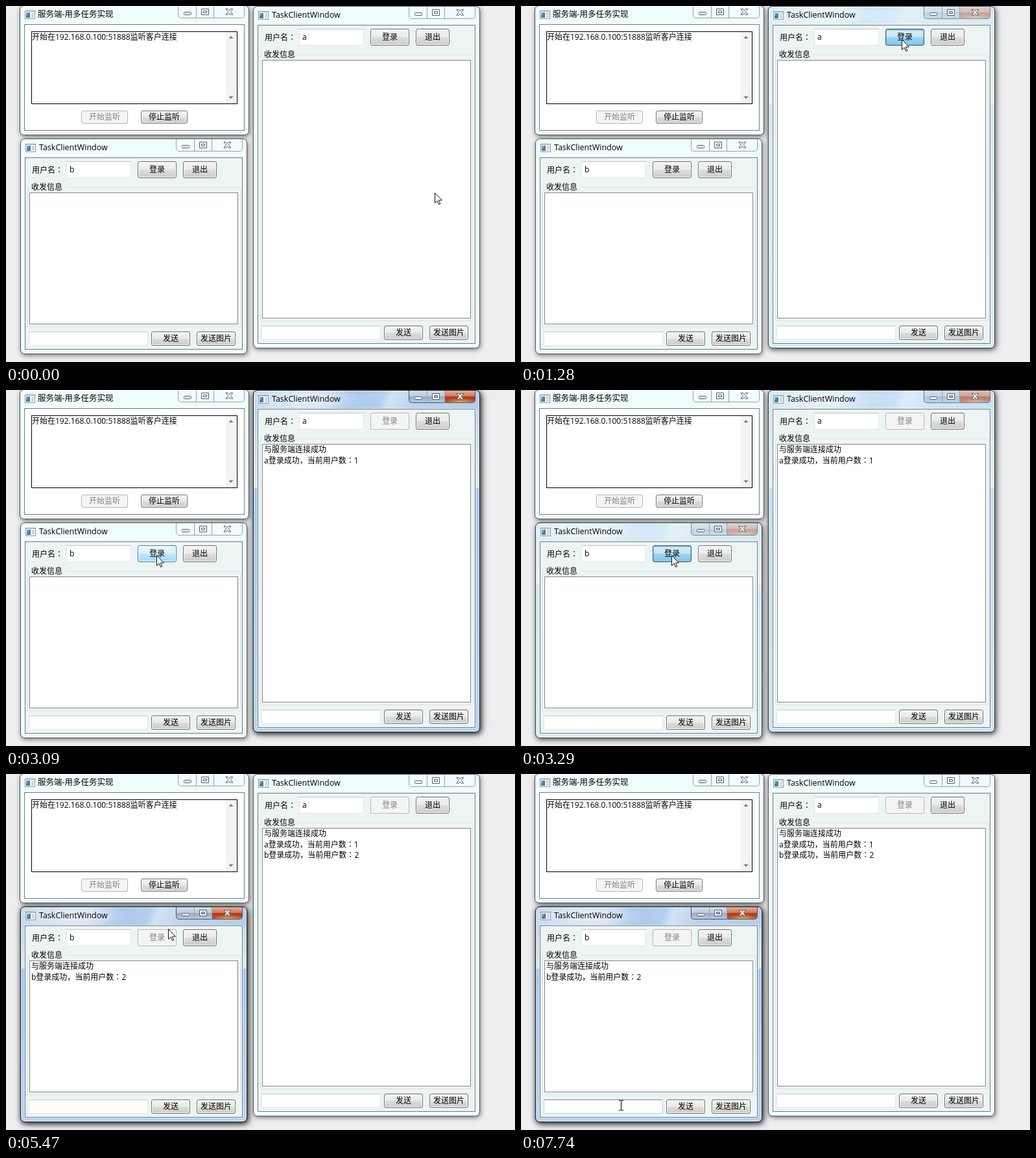
Animation, 785 px wide and 548 px high, one loop 8 s. Source, as an HTML page:

```html
<!DOCTYPE html>
<html lang="zh-CN">
<head>
<meta charset="utf-8">
<title>TaskClientWindow</title>
<style>
html, body { margin: 0; width: 100%; height: 100%; overflow: hidden; background: #eeeef0; }
* { box-sizing: border-box; }
body { position: relative; cursor: default; color: #000;
  font: 12px/16px "Open Sans", "Noto Sans CJK SC", "Noto Sans CJK", sans-serif; }
div { position: absolute; white-space: nowrap; }
svg { position: absolute; left: 0; top: 0; overflow: visible; }
i { font: inherit; font-family: "Noto Sans CJK JP", "Noto Sans CJK", sans-serif; }
.glass { inset: 0; border: 1px solid #4c5659; border-radius: 7px; background: #effdfd;
  box-shadow: inset 0 0 0 1px #fbffff, 1px 2px 7px rgba(0,0,0,.5); }
.lit { opacity: var(--on); border-color: #16191d;
  background:
    radial-gradient(ellipse 90px 24px at 80px 14px, rgba(240,246,252,.85), rgba(240,246,252,0)) no-repeat 0 0 / 100% 29px,
    linear-gradient(110deg, #c6daef 0, #c6daef 32%, #a9c7eb 42%, #b3cff0 56%, #d2e2f4 60%, #bdd3ee 72%, #b4cdea) no-repeat 0 0 / 100% 29px,
    linear-gradient(#b9d1ec 0, #dce8f3 28.6%, #a4caf1 28.7%, #b6d5f4 100%);
  box-shadow: inset 0 0 0 1px rgba(255,255,255,.65), 2px 2px 11px rgba(0,0,0,.7); }
.title { font-size: 12.5px; }
.client { border: 1px solid #6c797c; background: #edf4f4; box-shadow: 0 0 0 1px rgba(255,255,255,.6); }
.caption { border: 1px solid #98a4a7; border-top: 0; border-radius: 0 0 5px 5px; overflow: hidden; }
.caption.hot { opacity: var(--on); border-color: #485567;
  background: linear-gradient(#d3dfed, #b9cbdf 48%, #94abc5 50%, #b4cbe2); }
.close { background:
    radial-gradient(ellipse 24px 8px at 50% 100%, rgba(245,185,95,.9), rgba(245,185,95,0)),
    linear-gradient(#e3b09c, #cd7557 47%, #ad3a1c 50%, #bd5838); }
.btn { border: 1px solid #707070; border-radius: 3px; text-align: center;
  box-shadow: inset 0 0 0 1px rgba(255,255,255,.85);
  background: linear-gradient(#f3f3f3, #ebebeb 50%, #dddddd 50%, #cdcdcd); }
.hover { border-color: #3c7fb1; background: linear-gradient(#eaf6fd, #d9f0fc 50%, #bee6fd 50%, #a7d9f5); }
.press { border-color: #2c628b; box-shadow: inset 0 1px 2px rgba(30,80,115,.6);
  background: linear-gradient(#d8edf9, #c4e5f6 50%, #9fd4f0 50%, #86c5e6); }
.off { border-color: #adb2b5; background: #f4f4f4; color: #838383; }
.field { background: #fff; border: 1px solid #e1e6ea; border-top-color: #c3c8cc; border-radius: 1px; padding-left: 4px; }
.field.over { border-color: #c3dfef; border-top-color: #86b4d4; }
.field.focus { border-color: #b2d5ea; border-top-color: #5d95bf; }
.group { border: 1px solid #d3dde0; border-radius: 3px; box-shadow: inset 0 0 0 1px #fafdfd; }
.legend { background: #edf4f4; padding: 0 4px 0 2px; }
.list { background: #fff; border: 1px solid #828790; }
</style>
</head>
<body>
<script>
const LOOP = 8000;

function add(parent, cls, x, y, w, h, html = "") {
  const e = document.createElement("div");
  e.className = cls;
  e.style.cssText = `left:${x}px;top:${y}px;` + (w ? `width:${w}px;height:${h}px;` : "");
  e.innerHTML = html.replace(/：/g, '<i lang="ja">：</i>');
  parent.append(e);
  return e;
}
// Text placed by its left edge and vertical middle
const text = (p, x, mid, s, cls = "") => add(p, cls, x, mid - 8, 0, 0, s);

function button(p, x, y, w, h, s, cls = "") {
  const b = add(p, "btn " + cls, x, y, w, h, s);
  b.style.lineHeight = h - 2 + "px";
  return b;
}
function field(p, x, y, w, h, s = "") {
  const f = add(p, "field", x, y, w, h, s);
  f.style.lineHeight = h - 3 + "px";
  return f;
}

const ICON = `<svg width="16" height="13">
  <rect x=".5" y=".5" width="15" height="12" fill="#fdfdfd" stroke="#8e989f"/>
  <path d="M1 1.5h14" stroke="#c5ced4"/>
  <rect x="2" y="3" width="6" height="8" fill="#3f7cae"/>
  <rect x="2" y="3" width="3" height="4" fill="#6ba5cf"/>
  <rect x="10" y="3" width="4" height="8" fill="#d3d8dc"/></svg>`;

const GLYPHS = `<svg width="103" height="19" fill="#fff" stroke="#535a66">
  <path d="M28.5 0v19M55.5 0v19" stroke="#98a4a7"/>
  <rect x="9.5" y="9.5" width="11" height="4" rx="1"/>
  <path fill-rule="evenodd" d="M36.5 4.5h11v9h-11zM39.5 7.5h5v3h-5z"/>
  <path d="M74 4.5h3.4l2 2.4 2-2.4h3.4l-3.6 4.3 3.6 4.4h-3.4l-2-2.4-2 2.4h-3.4l3.6-4.4z"/></svg>`;

function frame(x, y, w, h, title, titleX) {
  const win = add(document.body, "win", x, y, w, h);
  win.style.setProperty("--on", 0);
  add(win, "glass", 0, 0);
  add(win, "glass lit", 0, 0);
  add(win, "", 8, 8, 16, 13, ICON);
  text(win, titleX, 14, title, "title");
  add(win, "caption", w - 110, 1, 103, 19);
  add(add(win, "caption hot", w - 110, 1, 103, 19), "close", 55, 0, 48, 19);
  add(win, "", w - 110, 1, 103, 19, GLYPHS);
  win.client = add(win, "client", 7, 29, w - 14, h - 36);
  return win;
}

function server() {
  const win = frame(21, -1, 354, 200, "服务端-用多任务实现", 28);
  win.client.style.background = "#fff";
  const log = add(win, "list", 18, 40, 318, 112);
  log.style.borderColor = "#000";
  text(log, 0, 8, "开始在192.168.0.100:51888监听客户连接");
  add(log, "", 299, 0, 17, 110, `<svg width="17" height="110">
    <rect width="17" height="110" fill="#f3f3f3"/>
    <path d="M4.5 10l3.5-4 3.5 4zM4.5 99l3.5 4 3.5-4z" fill="#7d7d7d"/></svg>`);
  button(win, 95, 162, 72, 20, "开始监听", "off");
  button(win, 187, 162, 72, 20, "停止监听");
}

function client(x, y, h, user, lines) {
  const win = frame(x, y, 350, h, "TaskClientWindow", 29);
  text(win, 18, 48, "用户名：");
  field(win, 71, 35, 100, 26, user);
  const login = button(win, 181, 35, 60, 26, "登录");
  button(win, 251, 35, 52, 26, "退出");
  add(win, "group", 11, 75, 329, h - 117);
  text(win, 15, 75, "收发信息", "legend");
  add(win, "list", 14, 83, 322, h - 129);
  const log = lines.map((s, i) => text(win, 17, 92 + 16 * i, s));
  const input = field(win, 13, h - 35, 184, 22);
  button(win, 202, h - 35, 60, 22, "发送");
  button(win, 272, h - 35, 60, 22, "发送图片");
  return { win, login, log, input };
}

server();
const hello = "与服务端连接成功";
const joined = (u, n) => `${u}登录成功，当前用户数：${n}`;
const a = client(381, 0, 527, "a", [hello, joined("a", 1), joined("b", 2)]);
const b = client(22, 204, 332, "b", [hello, joined("b", 2)]);
const caret = add(b.win, "", 18, 300, 1, 16);
caret.style.background = "#000";

const arrow = add(document.body, "", 0, 0, 12, 19, `<svg width="12" height="19">
  <path d="M.5.7v15.6l3.6-3.4 2.5 5.6 2.2-1-2.5-5.4h5z" fill="#fff" stroke="#111"/></svg>`);
const beam = add(document.body, "", 0, 0, 7, 16, `<svg width="7" height="16">
  <path d="M0 .5h3M4 .5h3M3.5 1v14M0 15.5h3M4 15.5h3" stroke="#000"/></svg>`);
arrow.style.zIndex = beam.style.zIndex = 9;

// Pointer runs: time, x, y
const runs = [
  [[0, 661, 287]],
  [[70, 657, 279], [400, 622, 166], [660, 589, 57], [730, 587, 51]],
  [[2130, 560, 88], [2450, 400, 190], [2800, 240, 261], [2930, 232, 254]],
  [[5470, 250, 238], [5780, 371, 118], [6160, 179, 488], [6260, 154, 517]],
  [[6320, 156, 521], [6460, 165, 524], [6700, 160, 515], [7020, 154, 503]],
  [[7170, 154, 507], [7320, 154, 510]]
];
const STEP = 72;

function pointer(t) {
  const run = runs.filter(r => r[0][0] <= t).pop();
  const i = run.filter(p => p[0] <= t).length - 1;
  const p = run[i], q = run[i + 1];
  if (!q) return [p[1], p[2]];
  const n = Math.max(1, Math.round((q[0] - p[0]) / STEP));
  const u = Math.floor((t - p[0]) / (q[0] - p[0]) * n) / n;
  return [p[1] + (q[1] - p[1]) * u, p[2] + (q[2] - p[2]) * u].map(Math.round);
}

// Last value in a list of [time, value] that has begun
const at = (t, list) => list.filter(k => k[0] <= t).pop()[1];
const show = (e, on) => { e.style.visibility = on ? "visible" : "hidden"; };

const aFocus = [[0, 0], [1280, .4], [1360, .75], [1440, 1], [3290, .6], [3375, .25], [3460, 0]];
const bFocus = [[0, 0], [3290, .4], [3375, .75], [3460, 1]];
const aLogin = [[0, ""], [660, "hover"], [1280, "press"], [2580, "off"]];
const bLogin = [[0, ""], [2930, "hover"], [3290, "press"], [4680, "off"]];
const bInput = [[0, ""], [6320, "over"], [7170, "focus"]];

function draw(t) {
  a.win.style.setProperty("--on", at(t, aFocus));
  b.win.style.setProperty("--on", at(t, bFocus));
  a.win.style.zIndex = t >= 1280 && t < 3290 ? 2 : 1;
  b.win.style.zIndex = t >= 3290 ? 2 : 1;
  a.login.className = "btn " + at(t, aLogin);
  b.login.className = "btn " + at(t, bLogin);
  b.input.className = "field " + at(t, bInput);
  a.log.forEach((e, i) => show(e, t >= (i < 2 ? 2580 : 4540)));
  b.log.forEach(e => show(e, t >= 4680));
  show(caret, t >= 7220 && t < 7740);

  const [x, y] = pointer(t);
  const typing = x > 35 && x < 219 && y > 501 && y < 524;
  show(arrow, !typing);
  show(beam, typing);
  arrow.style.transform = `translate(${x}px,${y}px)`;
  beam.style.transform = `translate(${x - 3}px,${y - 8}px)`;
}

const start = performance.now();
function tick() {
  draw((performance.now() - start) % LOOP);
  requestAnimationFrame(tick);
}
tick();
</script>
</body>
</html>
```
